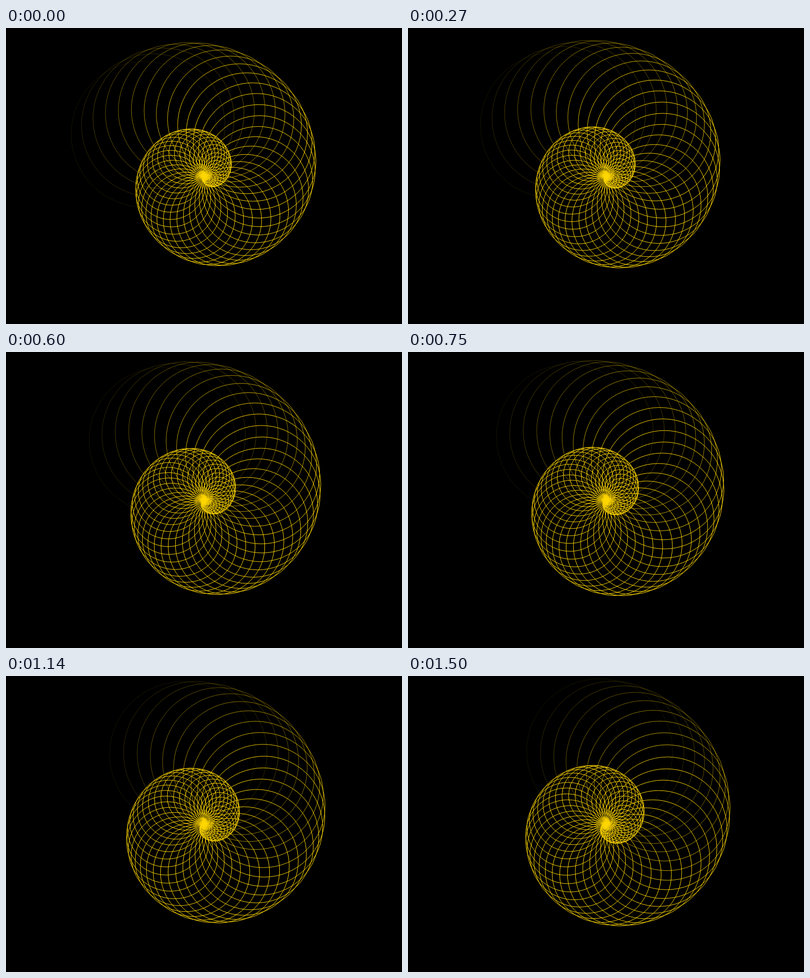
Write an HTML page that moves like this. It is 800 px wide and 600 px high and loops after 1530 ms.

```html
<!DOCTYPE html>
<html lang="en">
<head>
<meta charset="utf-8">
<title>Spiral of circles</title>
<style>
  html, body { margin: 0; width: 100%; height: 100%; overflow: hidden; background: #000; }
  svg { display: block; width: 100vw; height: 100vh; }
</style>
</head>
<body>
<svg id="stage" viewBox="0 0 800 600" fill="none" stroke="#ffd700" stroke-width="1"></svg>
<script>
const COUNT = 60;      // circles, smallest first
const GROW = 2.5;      // radius added per circle
const TWIST = 10;      // degrees between neighbours
const START = 85;      // angle of the smallest circle
const FADE = 11;       // outer circles that fade out
const TICK = 30;       // ms per one-degree turn
const LOOP = 1530;

const stage = document.getElementById('stage');
const circles = Array.from({ length: COUNT }, (_, i) => {
  const c = document.createElementNS('http://www.w3.org/2000/svg', 'circle');
  c.setAttribute('r', i * GROW);
  c.setAttribute('stroke-opacity', Math.min(1, (COUNT - i) / FADE));
  return stage.appendChild(c);
});

// Every circle passes through the middle of the stage.
function draw(ms) {
  const turn = Math.floor((ms % LOOP) / TICK);
  circles.forEach((c, i) => {
    const a = (START + turn - i * TWIST) * Math.PI / 180;
    c.setAttribute('cx', 400 + i * GROW * Math.cos(a));
    c.setAttribute('cy', 300 + i * GROW * Math.sin(a));
  });
}

const begin = performance.now();
function loop() {
  draw(performance.now() - begin);
  requestAnimationFrame(loop);
}
draw(0);
requestAnimationFrame(loop);
</script>
</body>
</html>
```
